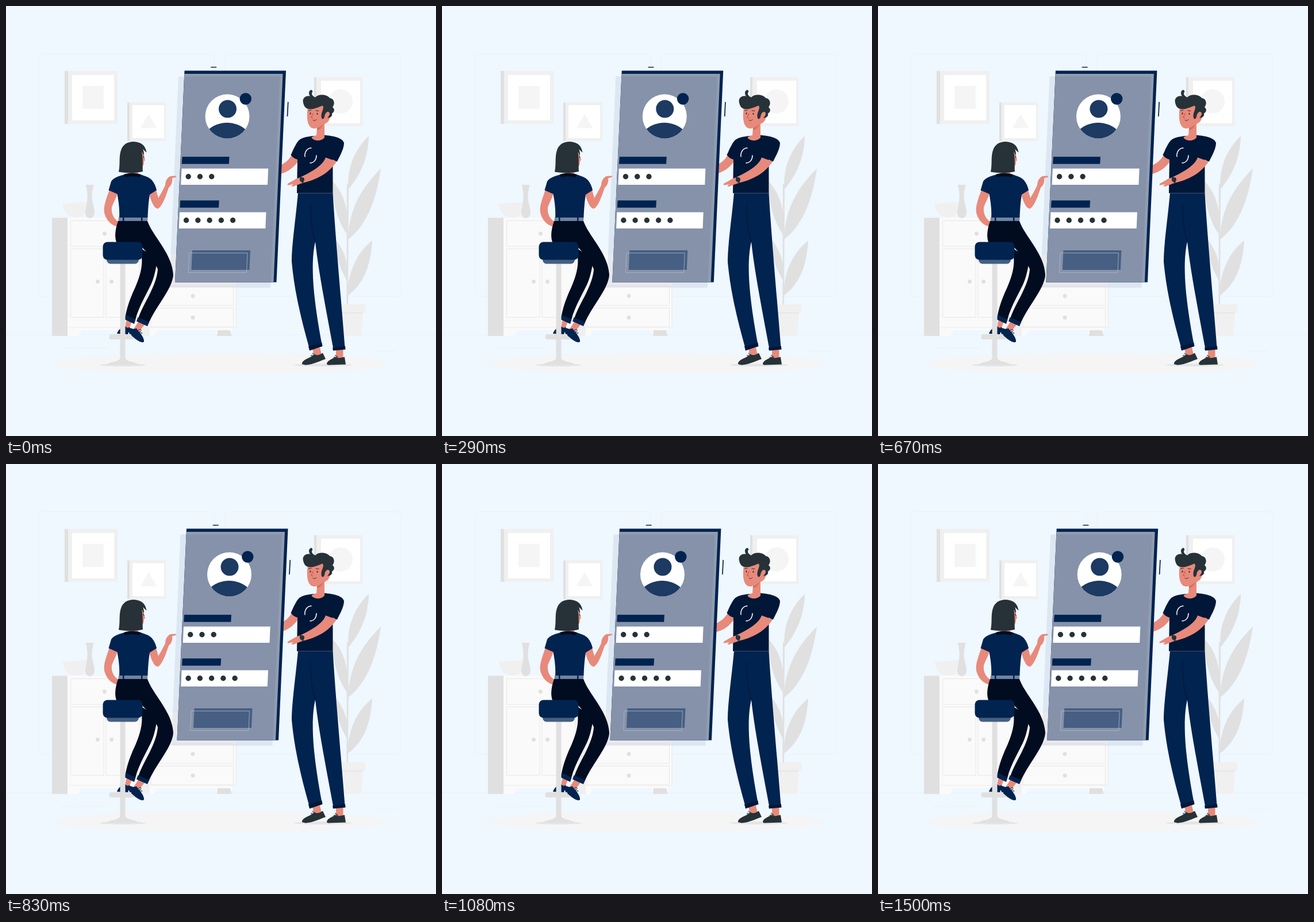
An HTML page for the animation above (1.54 s loop, 748 by 748 pixels).

```html
<!DOCTYPE html>
<html lang="en">
<head>
<meta charset="utf-8">
<title>Sign in</title>
<style>
  html, body { margin: 0; width: 100%; height: 100%; overflow: hidden; background: #eff7ff; }
  svg { display: block; width: 100vw; height: 100vh; }
  .navy { fill: #01234f; }
  .dusk { fill: #011738; }
  .night { fill: #010c20; }
  .ink { fill: #263238; }
  .skin { fill: #e78a7b; }
  .g1 { fill: #e0e0e0; }
  .g2 { fill: #f0f0f0; }
  .g3 { fill: #f5f5f5; }
  .g4 { fill: #fafafa; }
  .rim { fill: #fafafa; stroke: #e8e8e8; }
  .faint { fill: none; stroke: #e9f1f9; }
  .line { fill: none; stroke-linecap: round; }
</style>
</head>
<body>
<svg viewBox="0 0 748 748">
  <rect width="748" height="748" fill="#eff7ff"/>
  <g class="faint">
    <rect x="57.500" y="83" width="305" height="422" rx="6"/>
    <rect x="381.500" y="83" width="305" height="422" rx="6"/>
    <path d="M0 572H748M96 595.500H119M123 595.500H177M640 600.500H680"/>
  </g>
  <ellipse class="g3" cx="374" cy="622" rx="289" ry="18"/>

  <g id="pictures">
    <path class="g1" d="M102 113H109V205H102ZM211 168H217V235H211ZM536 124H542V209H536Z"/>
    <path class="g2" d="M108 113H194V204.500H108ZM215 167.500H278.500V235H215ZM540 123.500H620.500V209H540Z"/>
    <path fill="#fff" d="M115 120H188V199H115ZM220 172.500H275V230H220ZM548 130H616V204H548Z"/>
    <path class="g3" d="M133 139H170V179H133ZM248 188L262 212.500H234Z"/>
    <circle class="g3" cx="582" cy="166" r="21"/>
  </g>

  <g id="cabinet">
    <path class="g4" d="M107 368H238V432H400V559H393V574H367L364 564H263L258 574H238L232 564H131L126 574H107Z"/>
    <path class="g1" d="M80 368.500H107V574H80ZM368 564H390L393 574H367Z"/>
    <path class="g2" d="M237 432H250V574H237Z"/>
    <path class="rim" d="M112.500 373.500H232V418H112.500ZM112.500 422.500H170V541.500H112.500ZM174 422.500H232V541.500H174ZM252 487H395.500V521H252ZM252 525.500H395.500V558H252Z"/>
    <path class="line" stroke="#ebebeb" d="M107 559H400V487"/>
    <g class="g1" id="knobs"></g>
    <path class="g2" d="M99 344L146 341C145 358 135 368 122 368C108 368 100 358 99 344Z"/>
    <path class="g1" d="M139 311H152.500C149 325 148 335 153 351C156 364 151 369 146 369C140 369 136 364 139 351C143 335 142 325 139 311Z"/>
  </g>

  <g id="plant" class="g1">
    <path d="M592.500 520L593 310L596 310L595 520Z"/>
    <path d="M631 226C606 250 593 282 595.500 319C611 300 630 272 631 226Z"/>
    <path d="M652 283C618 317 598 350 594 407C626 383 644 340 652 283Z"/>
    <path d="M637 408C609 430 594 466 594 504C621 484 634 455 637 408Z"/>
    <path d="M566 303C589 325 598 360 593 397C579 378 568 345 566 303Z"/>
    <path d="M570 402C588 423 597 447 593 477C582 460 572 430 570 402Z"/>
    <path class="g2" d="M565 519H625V533H621L618 574H573L570 533H565Z"/>
    <path d="M570 533H621L620.500 535H570Z" opacity=".6"/>
  </g>

  <g id="man">
    <ellipse cx="551" cy="624.500" rx="51" ry="2.500" fill="#e3e5e8"/>
    <path class="skin" d="M533 597L546 594L549 607L537 610ZM574 596H586.500V612H574Z"/>
    <path class="ink" d="M515 623C514 618 522 614 529 611L537 606C542 609 547 606 551 603.500L556 614C545 618 533 624 521 624.500ZM558 623C558 617 566 615 573 610.500C579 614 584 611 589 610.500L591 623.500L560 624.500Z"/>
    <path class="line" stroke="#263238" stroke-width="1" d="M535 609C528 604 530 612 535 609M537 607C533 600 531 606 537 607M575 612C567 608 570 615 575 612M577 611C572 604 570 609 577 611"/>
    <path class="navy" d="M508 325H568.500C573 400 582 500 589.500 594L569.500 597C559 540 544 465 538 410C531 440 531 490 549 586L527 593C515 550 502 500 497 445C497 415 504 370 508 325Z"/>
    <path class="dusk" d="M526 592L549.500 585.500L550.500 592L528 599.500ZM568 594.500L590 591.500L590.500 597.500L569 599.500Z"/>
    <path class="line" stroke="#011a3c" stroke-width="1.500" d="M530 345C530 375 533 395 538 410"/>
    <path class="skin" d="M498 257C493 268 486 273 470 281V293.500C485 291.500 500 284 510 267Z"/>
    <path class="dusk" d="M530 226.500C518 228.500 511 230 506 238C501 246 498 254 495.500 259C499 264 503 266 507 267L506 325.500H568.500V267C572 269.500 575 271 576 270.500C581 260 588 249 588 238C585 229 570 226 553 224.500Z"/>
    <path class="line" stroke="#56698a" stroke-width=".7" d="M507 325.500H568"/>
    <path class="line" stroke="#fff" stroke-width="1.500" d="M520 262C519 254 524 247 531 247M540 260C540 267 536 273 529 273"/>
    <path class="skin" d="M556 263.500C552 276 535 287 514 297L504 301L491 308.500C488.500 310.500 489.500 312 492 311.500L500 310L496.500 313C498 316 504 312 517 307.500C540 302 561 292 575 270.500Z"/>
    <path class="ink" d="M513 296L518 306.500L515 308L510.500 298Z"/>
    <circle class="ink" cx="515" cy="302" r="4"/>
    <path class="skin" d="M525 175C523 190 523 205 530 211C534 214 539 213 541 212L540 225C533 227 531 228 532 230C538 236 549 235 554 229V205C559 204 564 198 564 190L557 173Z"/>
    <path fill="#d4705f" d="M541 212C546 211 550 208 552 204C551 211 546 215 541 216Z"/>
    <path class="ink" d="M532 146C526 146 526 153 529 157C521 155 515 161 517 168C518 174 521 178 526 179C535 181 544 175 551 173.500C554 178 549 183 548.500 190C548 197 552 199 554 193C555 186 559 182 562 185C565 189 560 193 559 195C566 194 568 191 567 187C572 184 572 179 568 176C573 170 571 161 563 160C557 153 543 153 538 159C533 157 530 152 533.500 149Z"/>
    <g class="ink"><ellipse cx="529.500" cy="187" rx="1" ry="1.700"/><ellipse cx="541.500" cy="187.500" rx="1" ry="1.700"/></g>
    <path class="line" stroke="#263238" d="M526.500 182L531 181.500M539 182L544 182.500M534 198.500C536 200 538.500 199.500 540 197.500"/>
    <path class="line" stroke="#d15747" stroke-width="1.300" d="M534 187C533 190 531 193 531 194L534 195"/>
  </g>

  <g id="phone">
    <path class="navy" d="M310.500 112.500H487L470.500 480.500H294Z"/>
    <path fill="#909cb0" d="M310.300 118H481.500L465.500 480H294Z"/>
    <path class="navy" opacity=".075" d="M300 122.500H476.500L460 490H284Z"/>
    <clipPath id="disc"><circle cx="385" cy="192" r="38.500"/></clipPath>
    <circle cx="385" cy="192" r="38.500" fill="#fff"/>
    <g fill="#1c3a62"><circle cx="385.500" cy="179" r="15.500"/><circle cx="384.500" cy="253" r="50" clip-path="url(#disc)"/></g>
    <circle class="navy" cx="416.800" cy="161.500" r="10.200"/>
    <path class="navy" d="M306.500 262.300H388.500L387.800 274.800H305.700ZM303.200 338.200H370.700L370 350.700H302.500Z"/>
    <path fill="#fff" d="M305.500 282.800H456.200L455 311H304.200ZM302 358.800H452.500L451.300 387H300.800Z"/>
    <g class="ink" id="dots"></g>
    <path fill="#465f82" d="M324 425H425L423.500 459H322.500Z"/>
    <path fill="none" stroke="#aeb9c8" stroke-width=".8" d="M318.700 429.700H420L418.500 463.700H317.200Z"/>
    <path class="line" stroke="#01234f" stroke-width="1.700" d="M357 106.500H365.500M490.700 167.500L489.500 191.500"/>
  </g>

  <g id="woman">
    <path class="skin" d="M180 319C174 338 168 350 172 363C176 375 186 383 195 384V375C186 369 183 359 184 350C188 340 192 333 194 326Z"/>
    <path class="skin" d="M249 327C253 342 258 352 264 352.500C271 350 277 334 283 316C288 312 290 306 289 299.500L294.500 298C297 297.500 296.500 295.500 294 295.500L286 296C280 299 277 305 277 312C272 322 268 329 265 334L261 320Z"/>
    <path class="skin" d="M234 250L239 253L240 262L242 268L240 270C240 278 238 280 233 280ZM213 286H230V297H213Z"/>
    <path class="ink" d="M196 288.500C199 275 196 262 200 251C204 238 217 234 229 237C238 239 243 245 244.500 255L238 249C240 253 240 257 240 260L236 253C239 266 237 278 238 288C224 291 209 291 196 288.500Z"/>
    <path class="line" stroke="#263238" stroke-width="1.200" d="M239 261L240 264"/>
    <path class="navy" d="M205 293.500C195 296 187 299 183 305L178.500 320.500L193.500 327C196 340 198 355 197 368H246.500C247 355 248 340 250 328L262 320.500C260 310 254 300 245 297L234 293Z"/>
    <path class="night" d="M205 293C213 289.500 226 289.500 234.500 293L232 298C223 295.500 215 295.500 207 298Z"/>
    <path fill="#6f83a3" d="M196 368H246.500L246 374H195.500Z"/>
    <path class="navy" d="M203 367H205.500V374H203ZM235 367H237.500V374H235Z"/>
    <path class="skin" d="M210 544L219 549L214 562L207 559ZM231 548L242 553L232 566L222 562Z"/>
    <path class="navy" d="M193 570C195 563 202 558 207 557C210 560 214 560 216 560L212 571ZM214 558C217 563 223 562 227 561C231 568 240 574 240 584C235 587 226 580 216 572C213 567 212 562 214 558Z"/>
    <path class="line" stroke="#01234f" d="M229 565C235 560 239 565 231 567M231 568C238 566 239 571 233 570"/>
    <path class="night" d="M232 420C242 445 233 470 225 489C217 506 211 522 208 538L225 546C230 526 242 505 252 485C258 472 260 460 264 440Z"/>
    <path class="night" d="M195 374H246C256 402 289 430 291 468C289 493 262 520 248 552L230 544C237 520 262 488 264 458C260 446 248 432 237 420L193 413C188 403 190 388 195 374Z"/>
    <path class="navy" d="M208 537L225.500 545.500L223 553L206 545ZM229.500 541.500L249 550L246 557L227 548.500Z"/>
  </g>

  <g id="stool">
    <ellipse cx="203" cy="624.500" rx="40" ry="2.500" fill="#e3e5e8"/>
    <path class="g1" d="M198.500 446H207.500V613C211 620 226 618 230 624H176C180 618 195 620 198.500 613Z"/>
    <rect class="g1" x="179.500" y="571" width="45" height="9" rx="4"/>
    <path fill="#455f83" d="M175 440H231C231 446 228 448.500 223 448.500H183C178 448.500 175 446 175 440Z"/>
    <rect class="navy" x="168.500" y="410.500" width="69" height="31" rx="8"/>
    <path class="navy" d="M217 560C221 563 224 562 227 561C231 568 240 574 240 584C235 587 226 580 218 573Z"/>
  </g>
</svg>
<script>
  const byId = id => document.getElementById(id);

  function addDots(id, r, points) {
    byId(id).innerHTML = points
      .map(([x, y]) => `<circle cx="${x}" cy="${y}" r="${r}"/>`).join('');
  }
  const row = (n, x, y) => Array.from({ length: n }, (_, i) => [x + 20.25 * i, y]);

  addDots('knobs', 3.4, [[171.5, 396], [159.5, 479.5], [183.5, 479.5], [325, 504.5], [325, 542]]);
  addDots('dots', 4.7, [...row(3, 317.2, 296.8), ...row(5, 313.6, 372.8)]);

  // Horizontal shake: one offset per tenth of the run, linear between them
  const LOOP = 1540, RUN = 1476, LEAD = 0.013, FPS = 24;
  const shake = [0, -1.5, 3, -6, 6, -6, 6, -6, 3, -1.5, 0];

  function offset(p) {
    const x = Math.min(p, 1) * 10;
    const i = Math.min(Math.floor(x), 9);
    return shake[i] + (shake[i + 1] - shake[i]) * (x - i);
  }

  const rest = offset(LEAD);
  const phone = byId('phone');

  function draw(now) {
    const t = now % LOOP;
    // Steps begin on the 10 ms grid
    const step = Math.ceil((Math.floor(t / 10) + 1) * FPS / 100) - 1;
    const x = offset(LEAD + step * 1000 / FPS / RUN) - rest;
    phone.setAttribute('transform', `translate(${x.toFixed(2)} 0)`);
  }

  const start = performance.now();
  function tick() {
    draw(performance.now() - start);
    requestAnimationFrame(tick);
  }
  tick();
</script>
</body>
</html>
```
